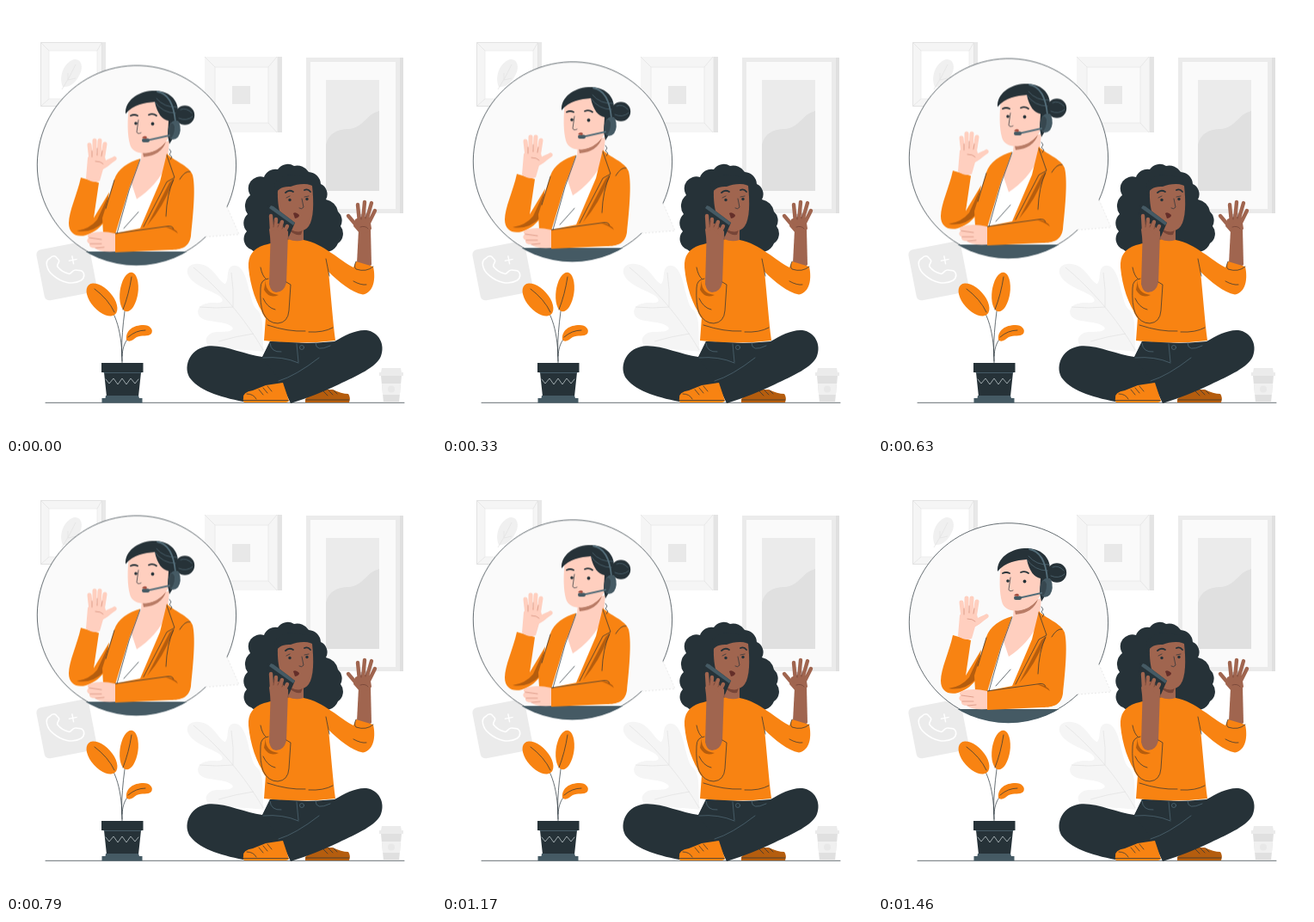
An HTML page without scripts that plays this animation: 500x500 px, repeating every 1500 ms.

```html
<!DOCTYPE html>
<html lang="en">
<head>
<meta charset="utf-8">
<title>Friendly phone call</title>
<style>
  html, body { margin: 0; width: 100%; height: 100%; overflow: hidden; background: #fff; }
  svg { display: block; width: 100vw; height: 100vh; }
  .bubble { animation: float 1.5s linear infinite; }
  @keyframes float {
    0%, 100% { transform: translateY(.5px); }
    50% { transform: translateY(-9.1px); }
  }
  .dark { fill: #263238; }
  .slate { fill: #455a64; }
  .orange { fill: #f88312; }
  .shade { fill: #b55d0e; }
  .light { fill: #ffcfbf; }
  .brown { fill: #a0654f; }
  .line { fill: none; stroke: #263238; stroke-width: .7; stroke-linecap: round; stroke-linejoin: round; }
  .fingers { fill: none; stroke-linecap: round; stroke-linejoin: round; stroke-width: 5; }
  .slim { stroke-width: 4.4; }
  .brow { stroke-width: 1.8; }
  .light-line { stroke: #ffcfbf; }
  .brown-line { stroke: #a0654f; }
  .blush { stroke: #d18b77; }
  .umber { stroke: #6f4034; }
  .steel { stroke: #546e7a; }
  .pale { stroke: #cfd8dc; }
  .soft { fill: none; stroke: #e4e4e4; stroke-width: .8; }
  .white { stroke: #fafafa; }
</style>
</head>
<body>
<svg viewBox="0 0 500 500">
  <defs>
    <clipPath id="round"><circle cx="151.5" cy="185.5" r="115.700"/></clipPath>
  </defs>

  <g id="pictures">
    <path fill="#e8e8e8" d="M40 42h76v75H40z"/>
    <path fill="#f5f5f5" stroke="#e0e0e0" stroke-width=".8" d="M40.500 42.500h71v74h-71z"/>
    <path fill="#fff" stroke="#ebebeb" stroke-width=".8" d="M50 52h56v56H50z"/>
    <path class="soft" d="M41 43l9 9M111 43l-5 9M41 116l9-8"/>
    <path fill="#f0f0f0" d="M66 94C61 82 67 66 79 62C88 61 90 71 86 79C82 88 75 95 66 94z"/>
    <path class="soft" d="M65 97Q73 85 81 68M72 86v-8M72 86l9-2"/>

    <path fill="#e4e4e4" d="M231 59h90v88h-90z"/>
    <path fill="#f5f5f5" d="M231 59h84.500v88H231z"/>
    <path fill="#fafafa" stroke="#e8e8e8" stroke-width=".8" d="M243 71h62v65h-62z"/>
    <path class="soft" d="M231 59l12 12M315 59l-10 12M231 147l12-11M315 147l-10-11"/>
    <path fill="#e8e8e8" d="M263 93h21v21h-21z"/>

    <path fill="#e0e0e0" d="M349 60h113v181H349z"/>
    <path fill="#ebebeb" d="M349 60h109v181H349z"/>
    <path fill="#fafafa" d="M354 65h99v171h-99z"/>
    <path fill="#ebebeb" d="M372 86h62v129h-62z"/>
    <path fill="#e0e0e0" d="M372 161C375 148 386 143 398 143C416 142 418 126 434 122V215H372z"/>
  </g>

  <g transform="rotate(-11 70.500 308)">
    <rect x="39.500" y="278" width="62" height="60" rx="6" fill="#ebebeb"/>
    <path fill="none" stroke="#fff" stroke-width="1.600" stroke-linejoin="round" d="M54 290C47 292 48 303 54 310C62 320 74 326 85 322C90 320 91 314 87 311L81 309C77 308 76 312 73 312C68 310 63 305 61 301C61 297 65 297 64 294L61 289Q58 287 54 290z"/>
    <path fill="none" stroke="#fff" stroke-width="1.400" d="M75 297h10M80 292v10"/>
  </g>

  <path fill="#f5f5f5" d="M300 402C280 399 249 400 235 394C229 388 235 379 246 379C258 379 266 378 263 373C253 365 232 369 225 361C219 351 229 344 243 345C253 346 254 342 248 337C235 329 216 325 211 311C209 301 220 297 232 302C243 307 249 322 255 323C260 318 255 304 264 302C275 300 280 317 283 332C286 342 287 350 293 354C301 364 297 382 300 402z"/>
  <path class="soft" d="M218 304C247 328 277 362 299 400M264 350Q245 352 225 350M288 381Q267 384 247 390M264 350Q265 329 262 310"/>

  <g class="bubble">
    <path fill="#fafafa" d="M257 233A115.700 115.700 0 1 0 232 268L271 265L257 233z"/>
    <path class="line" d="M257 233A115.700 115.700 0 1 0 232 268"/>
    <path class="soft" stroke-dasharray="2 2" d="M257 233L271 265L232 268"/>
    <g clip-path="url(#round)">
      <path class="slate" d="M30 285h240v30H30z"/>
    </g>

    <path class="orange" d="M87 199C83 218 73 238 73 252C73 264 82 269 93 266C104 262 110 257 116 248L120 216L102 246L108 205z"/>
    <path class="shade" d="M119 220L106 248Q97 259 82 261Q101 264 114 250z"/>
    <path class="light" d="M95 176L93 200Q101 206 109 203L113 189C120 186 123 181 128 177C130 174 125 174 116 179L114 171L98 171z"/>
    <path class="fingers light-line" d="M99 179L97 161M103 176L103 156M108 176L109 156M112 179L115 160M112 187L126 177"/>
    <path class="line blush" d="M104 180Q110 180 113 183M100 175v-7M106 173v-8M111 174l1-6"/>

    <path fill="#fff" d="M149 196L129 264L160 258L187 191z"/>
    <path class="line" d="M154 239L137 258"/>
    <path class="light" d="M158 164L157 178L145 203L152 224Q175 209 187 184L190 156z"/>
    <path fill="#b97c66" d="M159 170Q174 172 186 157Q181 173 160 175z"/>

    <path class="orange" d="M156 177C142 181 130 189 126 201L112 246L113 264L127 265L143 212z"/>
    <path class="orange" d="M187 171C194 179 213 185 217 196C221 212 217 247 215 267C213 280 204 283 191 283L127 286L126 264L156 258L179 204z"/>
    <path class="shade" d="M194 201L190 205L164 255Q183 233 195 202z"/>
    <path class="line" d="M187 173L196 199L187 204L160 256M195 201Q187 218 186 244M156 178L143 214L129 264M127 264L185 256Q194 254 195 259M126 202L116 235M202 201Q208 191 214 192"/>
    <path class="shade" d="M183 256Q196 256 200 264Q192 258 183 256z"/>

    <path class="light" d="M127 264Q110 260 98 264Q93 266 96 269Q92 273 97 276Q96 281 104 281Q107 286 127 285z"/>
    <path class="line blush" d="M97 269L111 271M98 276L111 276M104 281L114 280"/>

    <circle class="dark" cx="208" cy="126.500" r="11.200"/>
    <path class="light" d="M143 116C141 132 141 149 144 160C146 169 156 172 166 170C178 167 188 158 191 147L190 118L166 103z"/>
    <path class="dark" d="M139 125C138 110 153 99 170 98C188 97 200 107 200 122L198 147L190 160L188 150L189 133C182 132 176 125 173 111C161 112 148 114 139 125z"/>
    <path class="line steel" d="M173 111Q182 124 197 124M175 107Q184 118 199 117M203 120Q210 117 216 124M201 130Q210 134 217 128"/>
    <path class="line steel brow" d="M176 99Q194 102 197 134"/>
    <path class="slate" d="M191 136Q196 130 201 134Q205 144 200 152Q195 157 190 153Q187 145 191 136z"/>
    <path fill="#37474f" d="M190 138Q194 133 196 140Q196 150 191 154Q186 147 190 138z"/>
    <path class="line steel brow" d="M190 150Q177 153 163 156"/>
    <rect x="158" y="153.500" width="9" height="4.500" rx="2.200" class="slate"/>
    <path fill="#a64f40" d="M158 153Q161 149 164 152L163 154z"/>
    <path class="line brow" d="M145 127Q149 125 153 127M166 126Q171 124 175 127"/>
    <path class="line" d="M154 132L152 146Q153 149 157 147M190 166l2 3l-2 3l3 3l-2 3"/>
    <g class="dark"><circle cx="151" cy="136" r="1.800"/><circle cx="170.500" cy="136.500" r="1.900"/></g>
  </g>

  <path class="line" d="M46 461.300H463"/>

  <g id="plant">
    <path class="line" d="M135 415C135 383 130 355 108 334M135 413C133 386 138 350 144 319M135 407C136 391 142 382 158 377"/>
    <ellipse class="orange" cx="111.500" cy="341.500" rx="12.500" ry="23" transform="rotate(-42 111.500 341.500)"/>
    <ellipse class="orange" cx="143" cy="332.500" rx="10.500" ry="23" transform="rotate(8 143 332.500)"/>
    <path class="orange" d="M140 388C139 377 148 371 160 371C167 371 172 376 169 381C165 385 158 382 152 385C148 388 143 392 140 388z"/>
    <path class="line" d="M103 329Q119 341 126 356M146 315Q143 335 136 353M142 385Q151 377 162 377"/>
    <path class="dark" d="M111 415h48.500v11H157l-3 28h-37l-3-28h-3z"/>
    <path class="line steel" d="M114 426.500h43"/>
    <path class="line pale" d="M116 434l4 5l5-6l5 7l5-7l5 7l5-7l5 6l4-5"/>
    <path class="slate" d="M116 453h38l1 3h3.500v5.500h-47V456h4z"/>
  </g>

  <g id="cup">
    <path fill="#ebebeb" d="M437 421h22l1 5h2v4h-28v-4h2z"/>
    <path fill="#e0e0e0" d="M436 430h24l-3 31h-18z"/>
    <path fill="#f0f0f0" d="M437 439h22l-1 13h-20z"/>
    <circle cx="448" cy="445.500" r="4" fill="#e8e8e8"/>
  </g>

  <g id="caller">
    <path class="dark" d="M300 199A14 14 0 0 1 316 190A14 14 0 0 1 335 186A16 16 0 0 1 352 193A15 15 0 0 1 366 207A13 13 0 0 1 372 225A17 17 0 0 1 386 239A14 14 0 0 1 389 256A14 14 0 0 1 386 276A16 16 0 0 1 363 284L345 281L310 281A17 17 0 0 1 285 283A13 13 0 0 1 280 262A14 14 0 0 1 281 242A16 16 0 0 1 284 220A14 14 0 0 1 300 199z"/>

    <path class="brown" d="M410 260L408 299Q417 308 425 301L424 259z"/>
    <path class="brown" d="M406 248Q414 243 423 246L425 259Q422 265 411 264L404 256z"/>
    <path class="fingers slim brown-line" d="M409 257L398 244M411 252L409 231M415 250L417 228M419 250L425 229M421 254L429 238"/>
    <path class="line umber" d="M412 257Q418 255 421 259M413 248v-6M418 247l1-6"/>

    <path class="orange" d="M330 271C321 273 308 276 300 278C287 282 281 291 282 304C284 326 291 347 302 362L300 389Q340 394 383 389C380 366 378 338 375 309C387 321 402 333 415 335.500C428 333 430 317 427 303L407 297L404 304C389 297 369 276 346 272z"/>
    <path class="line" d="M372 294L376 314M407 297Q404 303 407 306Q419 310 427 303M304 371Q328 379 348 378M352 379Q369 380 380 374M404 320Q413 325 419 324"/>

    <path class="brown" d="M330 254L328 271Q337 275 346 272L346 254z"/>
    <path fill="#774537" d="M331 260Q342 265 345 260L343 266Q336 267 331 262z"/>
    <path class="brown" d="M316 213C327 204 344 203 356 209C358 228 358 247 352 256C348 262 340 263 332 260C321 255 315 237 316 213z"/>
    <path class="dark" d="M313 221Q316 209 331 210Q342 205 357 208L354 199L326 196L312 206z"/>
    <path class="line brow" d="M325 217Q329 213 334 216M347 214Q351 212 354 216"/>
    <path class="line" d="M344 224L346 234Q344 237 341 235M326 223l4-2M347 222l5-1"/>
    <g class="dark"><circle cx="330" cy="225.500" r="1.700"/><circle cx="350" cy="224.500" r="1.700"/></g>
    <path fill="#642e29" d="M334 241Q337 239 341 243Q341 246 336 247z"/>

    <path class="brown" d="M308 256L328 264L326 322Q323 333 314 333Q306 332 306 324z"/>
    <path class="dark" d="M305 231L311 233L336 252L329 268L303 248z"/>
    <path class="slate" d="M308 232L311 233L336 252L334 255L306 235z"/>
    <path class="brown" d="M306 260Q309 252 318 253L328 262Q329 271 324 276H308z"/>
    <path class="fingers slim brown-line" d="M309 260L308 244M313 259L314 248M318 260L321 251M323 264L327 256"/>
    <path class="line umber" d="M311 257l1-7M316 257l2-5M321 259l2-4"/>
    <path class="orange" d="M305 316Q295 318 296 329L297 354Q302 369 315 369Q328 368 329 356L331 324L326 321Q326 333 315 334Q306 333 305 316z"/>
    <path class="shade" d="M302 319Q301 334 317 336Q306 341 300 330z"/>
    <path class="line" d="M305 317Q296 318 296 328Q295 346 299 357Q305 369 316 369Q328 368 329 354L331 324L326 321M299 340Q304 351 313 353M296 304Q298 314 302 317"/>

    <path class="shade" d="M348 457Q353 451 364 446L380 446Q390 451 398 451Q401 455 399 461H348z"/>
    <path class="line" d="M349 458H399M369 448l5 5M375 447l5 5M381 447l4 4"/>
    <path class="dark" d="M307 390L298 408C277 405 252 393 234 395.500C212 399 205 422 215 434C226 448 253 456 281 461L321 438L358 410L350 392z"/>
    <path class="dark" d="M307 390Q342 394 382 390C394 383 407 376 419 377C434 379 441 394 436 407C431 420 408 430 387 440Q360 453 331 462L318 435L298 409z"/>
    <path class="line steel" d="M299 409Q322 407 340 415M317 436Q337 430 364 409M307 392Q308 403 320 402M338 393L340 414M360 392Q360 403 377 395"/>
    <circle class="line steel" cx="344" cy="397" r="2.500"/>
    <path class="orange" d="M276 456Q275 449 287 447L302 441L322 438L329 459Q328 461 324 461H277Q275 459 276 456z"/>
    <path class="line" d="M276 458.500H328M294 446l5 6M299 444l5 6M304 442l5 6M280 451Q288 451 291 457"/>
  </g>
</svg>
</body>
</html>
```
